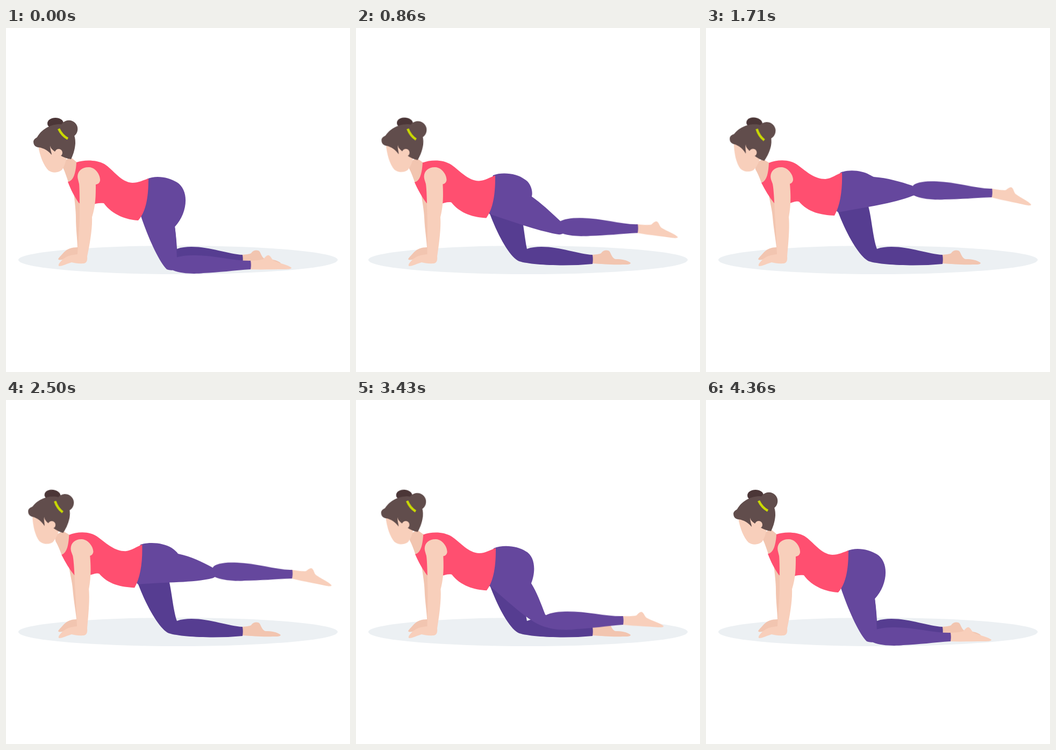
An HTML page without scripts that plays this animation: 640 px wide and 640 px high, repeating every 4.43 s.

```html
<!DOCTYPE html>
<html lang="en">
<head>
<meta charset="utf-8">
<title>Kneeling leg lift</title>
<style>
html, body { margin: 0; width: 100%; height: 100%; overflow: hidden; background: #fff; }
svg { display: block; width: 100%; height: 100%; }

.skin { fill: #f8cfbb; }
.shade { fill: #f2c5b0; }
.top { fill: #ff4f70; }
.near { fill: #65479d; }
.far { fill: #563d91; }
.hair { fill: #614d4c; }

.move { animation: 4430ms linear infinite; }
.sway { animation-timing-function: cubic-bezier(.37, 0, .63, 1); }

#torso { animation-name: torso; }
#neck { animation-name: neck; }
#arm { animation-name: arm; }
#farArm { animation-name: farArm; }
#farLeg { animation-name: farLeg; }
#head { animation-name: head; transform-origin: 95px 215px; }
#thigh { animation-name: thigh; }
#shin { animation-name: shin; }
#foot { animation-name: foot; }

/* upper body: two poses, eased both ways */
@keyframes torso {
  0%, 98.42%, 100% { d: path("M131,250C145,245 168,245 183,253C200,264 214,287 235,288C246,288 256,283 265,280C265,310 262,340 246,358C225,357 198,348 182,326C175,325 168,326 160,329L136,326C128,315 120,300 115,286C126,285 130,268 131,250Z"); }
  38.6%, 51.69% { d: path("M117,251C132,245 156,243 172,256C188,268 202,281 222,281C234,280 243,272 253,269C254,300 250,330 239,349C214,348 190,343 173,323C167,321 160,325 152,327L127,326C118,315 110,302 103,288C114,284 116,268 117,251Z"); }
}
@keyframes neck {
  0%, 98.42%, 100% { d: path("M104,250L120,240L132,250C131,268 127,285 116,287C113,278 110,268 106,260Z"); }
  38.6%, 51.69% { d: path("M90,252L106,244L118,251C117,268 115,284 103,288C100,279 96,270 92,263Z"); }
}
@keyframes arm {
  0%, 98.42%, 100% { d: path("M134,282C130,268 141,258 155,259C168,260 176,275 175,284C174,289 170,291 167,291C167,312 167,330 160,352C161,372 156,402 151,425C152,434 149,438 143,438C135,439 128,437 122,436C114,438 106,443 99,443C95,441 102,434 106,430C112,425 120,422 133,421C134,400 137,370 137,345C137,320 137,300 136,290Z"); }
  38.6%, 51.69% { d: path("M121,282C117,268 128,258 141,259C154,260 163,275 162,283C161,288 158,289 156,290C158,312 158,330 154,352C156,372 153,402 151,425C152,434 149,438 143,438C135,439 128,437 122,436C114,438 106,443 99,443C95,441 102,434 106,430C112,425 120,422 132,421C131,400 130,370 128,345C127,320 126,300 124,290Z"); }
}
@keyframes farArm {
  0%, 98.42%, 100% { d: path("M126,305C128,325 130,340 130,352C130,375 133,395 133,408C122,408 114,411 108,417C104,422 99,426 97,430C99,433 106,431 112,428L124,424L145,424L150,320Z"); }
  38.6%, 51.69% { d: path("M116,305C119,325 123,338 124,352C126,375 130,395 131,408C122,408 114,411 108,417C104,422 99,426 97,430C99,433 106,431 112,428L124,424L145,424L140,320Z"); }
}
@keyframes farLeg {
  0%, 98.42%, 100% { d: path("M238,335L253,351C268,392 288,428 304,434C326,441 390,444 440,439C441,433 441,428 440,422C415,421 380,407 345,407C335,407 326,408 318,411C317,390 314,365 310,343Z"); }
  38.6%, 51.69% { d: path("M238,335L246,343C263,388 287,427 303,434C325,441 390,444 440,439C441,433 441,428 440,422C415,421 380,407 345,407C335,407 326,408 318,411C310,388 308,350 301,328Z"); }
}
@keyframes head {
  0%, 98.42%, 100% { transform: translate(0, 0) rotate(0deg); }
  38.6% { transform: translate(-7.8px, -.5px) rotate(9deg); }
  51.69% { transform: translate(-10.8px, 0) rotate(8deg); }
}

/* lifted leg */
@keyframes thigh {
  0%, 98.42%, 100% { d: path("M262,281C280,273 303,278 318,287C342,302 338,345 314,370C316,385 317,400 318,428C330,440 318,456 299,449C285,435 265,392 251,350L238,335Z"); }
  11.29% { d: path("M259,278C277,271 303,275 316,285C337,295 336,322 330,338C341,355 352,375 362,394C378,408 380,421 366,418C335,411 298,383 255,349L238,335Z"); }
  19.3%, 66.93% { d: path("M255,274C273,267 300,271 313,281C325,287 330,304 327,314C344,326 362,343 379,359C391,370 391,385 378,385C345,380 295,362 251,347L238,335Z"); }
  27.31% { d: path("M252,271C270,264 297,268 310,278C316,282 320,287 322,291C345,298 366,308 386,318C396,325 396,335 386,337C345,346 290,338 247,346L238,335Z"); animation-timing-function: ease-out; }
  38.6%, 51.69% { d: path("M250,269C268,262 292,266 304,273C308,275 310,276 312,277C338,279 362,286 383,293C394,300 394,309 385,312C345,328 290,334 246,343L238,335Z"); }
  56.43% { d: path("M250,269C268,263 294,266 308,275C314,279 318,283 320,286C345,291 366,302 383,311C394,318 394,328 385,331C345,341 290,338 246,343L238,335Z"); }
  77.43% { d: path("M256,276C274,268 302,272 315,281C335,291 334,322 326,341C336,357 344,378 352,399C366,410 370,426 356,423C325,417 288,378 252,349L238,335Z"); }
  90.29% { d: path("M260,280C279,272 303,276 317,286C340,299 337,340 317,363C321,378 324,395 327,421C340,433 331,449 313,445C295,430 270,389 251,350L238,335Z"); animation-timing-function: ease-out; }
}
@keyframes shin {
  0%, 98.42%, 100% { transform: translate(455px, 441px) rotate(0deg); }
  11.29% { transform: translate(506px, 409px) rotate(.5deg); }
  19.3%, 66.93% { transform: translate(524px, 374px) rotate(1deg); }
  27.31% { transform: translate(533px, 332px) rotate(2deg); animation-timing-function: ease-out; }
  38.6%, 51.69% { transform: translate(532px, 307px) rotate(2deg); }
  56.43% { transform: translate(532.5px, 324px) rotate(2deg); }
  77.43% { transform: translate(497px, 410px) rotate(-.8deg); }
  90.29% { transform: translate(465px, 436px) rotate(-.4deg); animation-timing-function: ease-out; }
}
@keyframes foot {
  0%, 98.42%, 100% { transform: rotate(0deg); }
  11.29%, 77.43% { transform: rotate(5deg); }
  27.31% { transform: rotate(9deg); }
  38.6%, 51.69% { transform: rotate(10.7deg); }
  56.43% { transform: rotate(10deg); }
}
</style>
</head>
<body>
<svg viewBox="0 0 640 640">
  <ellipse cx="320" cy="431.5" rx="297" ry="26.5" fill="#ecf0f3"/>

  <path id="farArm" class="move sway shade"/>

  <path class="shade" d="M437,422C448,421 452,421 456,419C460,413 468,412 472,416C476,424 478,429 483,430C495,430 505,432 511,437C511,440 505,440 497,440C478,441 460,439 437,438Z"/>
  <path id="farLeg" class="move sway far"/>

  <path id="thigh" class="move near"/>
  <g id="shin" class="move">
    <path id="foot" class="move skin" d="M-4,-8C8,-8 18,-9 24,-11C28,-16 31,-19 34,-18C38,-16 39,-11 43,-8C54,-3 70,0 76,5C76,8 68,8 60,8C40,8 20,9 -4,8Z"/>
    <path class="near" d="M0,-8C-30,-7 -70,-19 -108,-18C-125,-18 -140,-15 -146,-10C-152,-4 -150,6 -144,10C-130,16 -105,17 -88,15C-60,14 -30,10 0,8C1,3 1,-3 0,-8Z"/>
  </g>

  <path id="neck" class="move sway shade"/>
  <path id="torso" class="move sway top"/>

  <g id="head" class="move sway">
    <ellipse cx="92" cy="177.5" rx="15" ry="10.5" fill="#4b3637"/>
    <path class="skin" d="M60,220C63,238 70,256 79,265C86,270 97,270 104,264C109,257 111,249 113,240L95,210Z"/>
    <path class="hair" d="M51,211C52,206 56,205 58,203C66,189 82,179 100,179C120,181 130,197 129,215C128,228 124,238 121,244C113,243 106,240 101,237L95,226L91,230C87,227 83,224 82,219C82,226 85,232 85,236C79,229 71,223 60,222C53,221 51,216 51,211Z"/>
    <circle class="hair" cx="117" cy="188" r="16.3"/>
    <circle class="skin" cx="98" cy="232" r="7"/>
    <path d="M98,187.5Q104,200 115,206" fill="none" stroke="#c9d900" stroke-width="4.5"/>
  </g>

  <path id="arm" class="move sway skin"/>
</svg>
</body>
</html>
```
